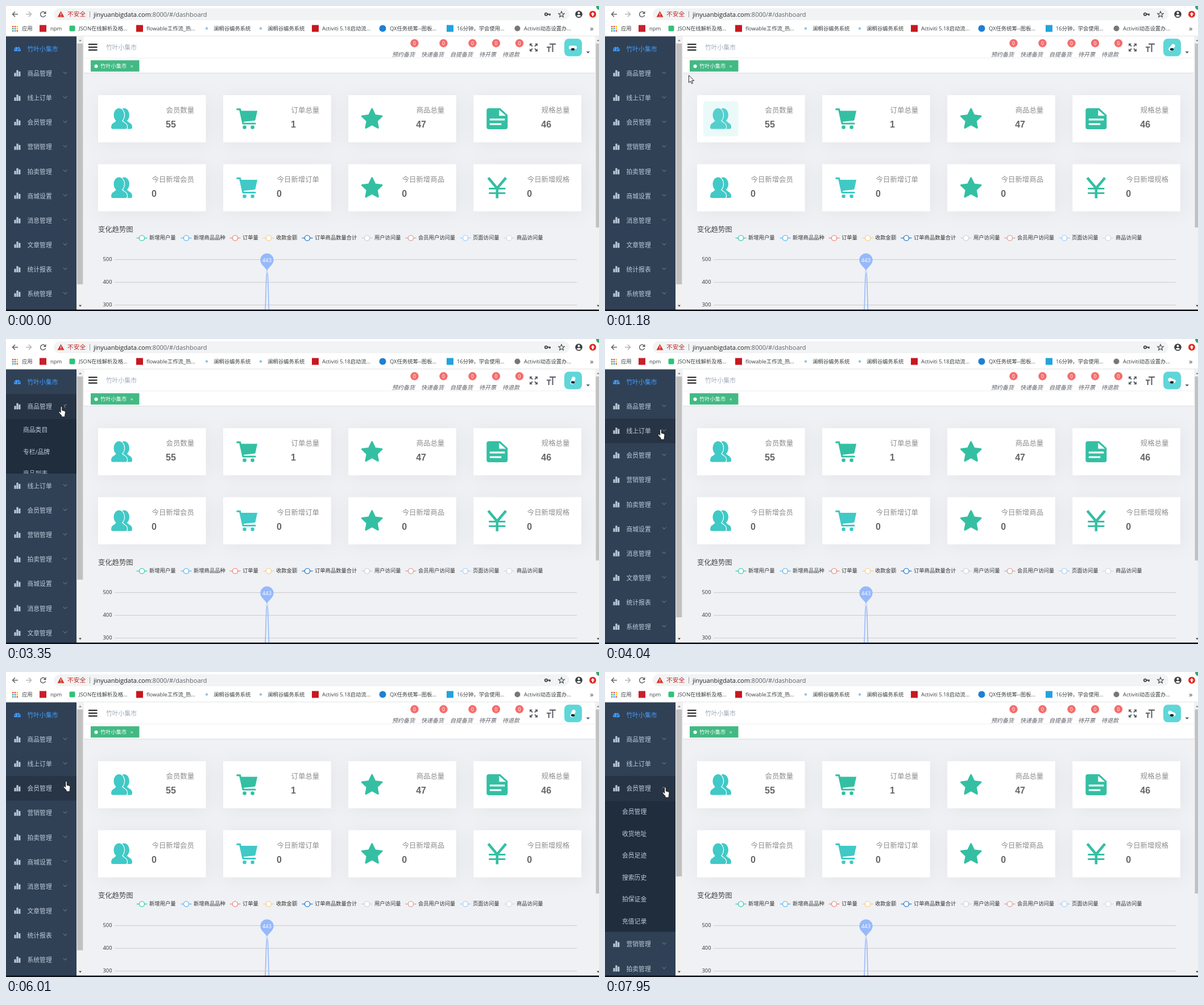
Write an HTML page that moves like this. It is 1043 px wide and 537 px high and loops after 8000 ms.

```html
<!DOCTYPE html>
<html lang="zh-CN">
<head>
<meta charset="utf-8">
<title>Dashboard</title>
<style>
html, body { margin: 0; height: 100%; overflow: hidden; background: #fff; }
#stage { display: block; width: 100vw; height: 100vh; }
text { font-family: "Open Sans", "Noto Sans CJK SC", "Noto Sans CJK", sans-serif; white-space: pre; }
.num { font-family: "Liberation Sans", Arial, sans-serif; font-weight: bold; }
.line { fill: none; stroke: currentColor; }
.icon { fill: currentColor; }
.gap { fill: none; stroke: var(--back); }
.cards { filter: drop-shadow(3px 3px 15px rgba(0, 0, 0, .05)); }
</style>
</head>
<body>
<svg id="stage" viewBox="0 0 1043 537"></svg>
<script>
const LOOP = 8000, ROW = 43.12, SUB = 38.5, TOP = 53.9;
const SHOP = '竹叶小集市';
const stage = document.getElementById('stage');
const $ = id => document.getElementById(id);

// ---- markup helpers ----
const rect = (x, y, w, h, fill, more = '') =>
  `<rect x="${x}" y="${y}" width="${w}" height="${h}" fill="${fill}" ${more}/>`;
const circle = (x, y, r, fill, more = '') =>
  `<circle cx="${x}" cy="${y}" r="${r}" fill="${fill}" ${more}/>`;
const path = (d, fill, more = '') => `<path d="${d}" fill="${fill}" ${more}/>`;
const line = (d, color, w, more = '') =>
  path(d, 'none', `stroke="${color}" stroke-width="${w}" ${more}`);
// y is the vertical middle of the glyphs
const text = (x, y, s, size, fill, more = '') =>
  `<text x="${x}" y="${(y + size * .37).toFixed(2)}" font-size="${size}" fill="${fill}" ${more}>${s}</text>`;
const at = (x, y, body, more = '') => `<g transform="translate(${x} ${y})" ${more}>${body}</g>`;

// ---- browser bars ----
function browser() {
  const grey = '#5f6368', ink = '#3c4043';
  let s = rect(0, 0, 1043, 53.5, '#fff') + rect(84, 4, 907, 21, '#f1f3f4', 'rx="10.5"');
  s += line('M21 14.5H12M16 10L11.5 14.5L16 19', grey, 1.5);
  s += line('M35 14.5H44M40 10L44.5 14.5L40 19', '#b4b6b9', 1.5);
  s += line('M69 12A4.6 4.6 0 1 0 69.6 16', grey, 1.5) + path('M70.5 9V14H65.5Z', grey);
  s += path('M96.5 9L102.5 19.5H90.5Z', '#d93025') + rect(96, 12.5, 1.1, 3.5, '#fff') + rect(96, 17, 1.1, 1.2, '#fff');
  s += text(108, 14.5, '不安全', 10.7, '#c5221f') + rect(147, 9, 1, 11, '#9aa0a6');
  s += text(154, 14.5, `jinyuanbigdata.com<tspan fill="${grey}">:8000/#/dashboard</tspan>`, 11, '#202124');
  s += circle(950, 14.5, 2.2, 'none', `stroke="${ink}" stroke-width="1.8"`) + line('M952.5 14.5H958M956.5 14.5V17', ink, 1.8);
  s += line(starPath(977, 15, 5.5, 2.4), ink, 1.1);
  s += circle(1007.5, 14.5, 6.3, ink) + circle(1007.5, 12.3, 2, '#fff') + path('M1003.5 17.5Q1007.5 13.7 1011.5 17.5Q1007.5 20.5 1003.5 17.5Z', '#fff');
  s += circle(1032, 14.5, 6, '#e0281e') + path('M1032 10.8L1035.5 14.8H1033.3V18H1030.7V14.8H1028.5Z', '#fff');
  s += circle(1044, 1, 6, '#35a56c');
  const dots = ['#ea4335', '#ea4335', '#fbbc04', '#34a853', '#4285f4', '#fbbc04', '#34a853', '#4285f4', '#ea4335'];
  dots.forEach((c, i) => s += rect(11 + i % 3 * 3.8, 35 + (i / 3 | 0) * 3.8, 2.4, 2.4, c));
  const square = (x, c) => rect(x, 33.5, 12, 12, c);
  s += square(59, '#c8202a') + rect(111.5, 34.5, 10, 10, '#2fc27a', 'rx="2"') + square(229, '#c8171e');
  s += circle(353, 39.5, 2.2, '#8cc4ea') + circle(448, 39.5, 2.2, '#8cc4ea') + square(538, '#c8171e');
  s += circle(662.5, 39.5, 6, '#1e80d2') + square(775, '#23a3dc') + circle(899.5, 39.5, 5, '#777');
  const marks = [[28, '应用'], [78, 'npm'], [128, 'JSON在线解析及格...'], [247, 'flowable工作流_热...'],
    [365, '澜桐谷编务系统'], [460, '澜桐谷编务系统'], [556, 'Activiti 5.18启动流...'],
    [675, 'QX任务统筹--图板...'], [793, '16分钟，学会使用...'], [911, 'Activiti动态设置办...']];
  marks.forEach(([x, name]) => s += text(x, 39.5, name, 9.35, ink));
  return s + text(1027, 39, '»', 13, ink) + rect(0, 52.5, 1043, 1, '#d8dadd');
}

function starPath(cx, cy, big, small) {
  let d = '';
  for (let i = 0; i < 10; i++) {
    const r = i % 2 ? small : big, a = i * Math.PI / 5;
    d += `${i ? 'L' : 'M'}${(cx + r * Math.sin(a)).toFixed(2)} ${(cy - r * Math.cos(a)).toFixed(2)}`;
  }
  return d + 'Z';
}

// ---- page header ----
function header() {
  const ink = '#5a5e66';
  let s = rect(137, 53.5, 899, 38.5, '#fff') + rect(137, 91, 899, 1, '#eef0f3') + rect(137, 92, 899, 26, '#fff') + rect(137, 117.5, 899, 1, '#d8dce5');
  s += line('M145 67.5H160.5M145 72.5H160.5M145 77.5H160.5', '#111', 2);
  s += text(176, 73, SHOP, 10.8, '#a0abb9');
  [[679, '预约备货', 718.5], [730, '快递备货', 769.5], [781, '自提备货', 820.5], [832, '待开票', 862], [873, '待退款', 903]]
    .forEach(([x, name, badge]) => {
      s += text(x, 85, name, 10, ink, 'font-style="italic"');
      s += circle(badge, 65.5, 7.2, '#f56c6c') + text(badge, 65.5, '0', 8.6, '#fff', 'text-anchor="middle"');
    });
  for (let a = 0; a < 360; a += 90)
    s += `<g transform="translate(928 73) rotate(${a})">${path('M-7 -7H-2L-7 -2Z', ink) + line('M-6 -6L-2 -2', ink, 2)}</g>`;
  s += line('M956 67H967M961.5 67V81M951 72.5H958.5M954.7 72.5V81', ink, 2);
  s += rect(982, 57.5, 31, 31, '#5fd6d8', 'rx="7.7"');
  s += at(997, 73, rect(-7, -3.2, 14, 6.4, '#fff', 'rx="3.2" id="body"') + '<ellipse cx="0" cy="3.2" rx="3.2" ry="2.2" fill="#1d2a30"/>');
  s += path('M1020.5 80H1027L1023.7 83.5Z', ink);
  s += rect(149, 95.5, 85.5, 20, '#42b983') + circle(158.5, 106, 3.1, '#fff') + text(166, 105.5, SHOP, 9.24, '#fff');
  return s + line('M219.5 104.5L223 108M223 104.5L219.5 108', '#fff', .8);
}

// ---- cards ----
const TEAL = '#40c9c6', GREEN = '#34bfa3';
const person = '<ellipse cx="13.7" cy="12" rx="9.3" ry="12"/><path d="M0 33.5Q0 27.5 5 25.5L10 21H17.5L23 25.5Q28 27.5 28 33.5Q28 36.5 25 36.5H3Q0 36.5 0 33.5Z"/>';
const icons = {
  people: `<g class="icon"><g transform="translate(9 0)">${person}</g><g stroke="var(--back)" stroke-width="2.4">${person}</g>${person}</g>`,
  cart: '<path class="icon" d="M7 4.5H37L33.5 20.5Q33.2 21.7 32 21.8L11.500 24Z"/><path class="line" stroke-width="3.2" stroke-linecap="round" stroke-linejoin="round" d="M1.600 1.800H6.500L12 27H33"/><g class="icon"><circle cx="14.5" cy="33.5" r="3.3"/><circle cx="28.5" cy="33.5" r="3.3"/></g>',
  star: `<path class="icon" stroke="currentColor" stroke-width="3" stroke-linejoin="round" d="${starPath(18.5, 19.6, 18.2, 8.9)}"/>`,
  doc: '<path class="icon" d="M4 0H24L37 12V33Q37 37 33 37H4Q0 37 0 33V4Q0 0 4 0Z"/><path fill="var(--back)" d="M22 2.800L34 13.300H22Z"/><path class="gap" stroke-width="3.2" d="M5.500 19.800H32M5.500 28H26"/>',
  yen: '<path class="line" stroke-width="4.6" d="M3 1L18.5 19.5L34 1M18.5 18V37"/><path class="line" stroke-width="3.2" d="M4 20H33M4 28H33"/>'
};
const cards = [
  ['people', TEAL, '会员数量', 55], ['cart', GREEN, '订单总量', 1], ['star', GREEN, '商品总量', 47], ['doc', GREEN, '规格总量', 46],
  ['people', TEAL, '今日新增会员', 0], ['cart', TEAL, '今日新增订单', 0], ['star', GREEN, '今日新增商品', 0], ['yen', GREEN, '今日新增规格', 0]
].map(([icon, color, label, value], i) =>
  ({ icon, color, label, value, x: 162 + i % 4 * 220.1, y: i < 4 ? 157 : 278.5 }));

function cardGrid() {
  const back = cards.map(c => rect(c.x, c.y, 189.5, 83, '#fff')).join('');
  const front = cards.map((c, i) => at(c.x, c.y,
    `<g id="card${i}">${rect(11, 11, 61.6, 61.6, 'var(--back)', 'rx="4.6"')}${at(23, 23, icons[c.icon])}</g>`
    + text(i < 4 ? 119.5 : 94.5, 26.5, c.label, 12.4, '#8c8c8c')
    + text(i < 4 ? 119 : 94, 51.5, c.value, 16, '#666', 'class="num"'))).join('');
  return `<g class="cards">${back}</g>${front}`;
}

// ---- chart ----
function chart() {
  let s = text(162, 393, '变化趋势图', 12.3, '#464646');
  [[239, '新增用户量', '#3fcfb8'], [317, '新增商品品种', '#62bdf5'], [403, '订单量', '#f08d84'], [462, '收款金额', '#f9cf8c'],
    [530, '订单商品数量合计', '#2f80d0'], [635, '用户访问量', '#cfd2e0'], [712, '会员用户访问量', '#dba59d'],
    [808, '页面访问量', '#a8d0f8'], [885, '商品访问量', '#dadbe0']].forEach(([x, name, c]) => {
    s += line(`M${x - 9.5} 408.5H${x + 9.5}`, c, 1.4) + circle(x, 408.5, 4.6, '#fff', `stroke="${c}" stroke-width="1.4"`);
    s += text(x + 13, 407.5, name, 9.3, '#333');
  });
  [500, 400, 300].forEach((v, i) => {
    const y = 446.5 + 40 * i;
    s += line(`M191 ${y}H1004`, '#ccc', 1) + text(186.5, y - .8, v, 9.3, '#333', 'text-anchor="end"');
  });
  s += line('M456 537C457.5 500 457.5 469 459.3 469S461 500 462.5 537', '#97b9fb', 1.6);
  s += circle(459, 468.5, 1.6, '#fff', 'stroke="#97b9fb" stroke-width=".8"');
  s += path('M459 466.5C456 459 447.3 456 447.3 447.3A11.7 11.7 0 0 1 470.7 447.3C470.7 456 462 459 459 466.5Z', '#97b9fb');
  return s + text(459, 448, 443, 9.3, '#fff', 'text-anchor="middle"');
}

// ---- side menu ----
const titles = [SHOP, '商品管理', '线上订单', '会员管理', '营销管理', '拍卖管理', '商城设置', '消息管理', '文章管理', '统计报表', '系统管理', '日志管理'];
const subs = [
  { row: 1, on: 2060, off: 3227, items: ['商品类目', '专栏/品牌', '商品列表', '商品规格'] },
  { row: 2, on: 4300, off: 5300, items: ['线上订单', '通用问题', '手机发货'] },
  { row: 3, on: 6250, off: 1e9, items: ['会员管理', '收货地址', '会员足迹', '搜索历史', '拍保证金', '充值记录'] }
];
const PALE = '#bfcbd9';

function sideMenu() {
  const gauge = path('M-5.5 4A5.8 5.8 0 1 1 5.5 4Z', '#409eff')
    + [-3.6, 0, 3.6].map(x => circle(x, x ? .5 : -3, .9, '#304156')).join('') + line('M0 3L1.5 -1', '#304156', 1.3);
  const bars = rect(14.5, 20.7, 3.1, 6.2, PALE) + rect(18.4, 16, 3.1, 10.9, PALE) + rect(22.3, 18.3, 3.1, 8.6, PALE);
  const panels = subs.map((m, i) => `<g id="sub${i}">${rect(0, 0, 124, m.items.length * SUB + 1, '#1f2d3d')}${
    m.items.map((s, k) => text(30, 20 + k * SUB, s, 10.8, PALE)).join('')}</g>`).join('');
  const rows = titles.map((s, i) => `<g id="row${i}">${rect(0, 0, 124, 44, '#304156', `id="fill${i}"`)}${
    i ? bars : at(20, 21.5, gauge)}${text(37.5, 22, s, 10.8, i ? PALE : '#409eff')}${
    i ? at(104, 20.5, line('M-3.3 -1.7L0 1.7L3.3 -1.7', '#8794a4', .9, `id="arrow${i}"`)) : ''}</g>`).join('');
  return rect(0, 53.5, 124, 483.5, '#304156')
    + `<svg y="${TOP}" width="124" height="481">${panels}${rows}</svg>`;
}

function scrollbars() {
  const up = 'M-2.5 1.5H2.5L0 -1.5Z', down = 'M-2.5 -1.5H2.5L0 1.5Z';
  return rect(124, 53.5, 13, 481.5, '#f1f1f1') + rect(125, 66, 10.3, 424, '#c1c1c1', 'id="thumb"')
    + rect(1036, 53.5, 7, 481.5, '#f1f1f1') + rect(1037.5, 66, 5.5, 324, '#c1c1c1')
    + at(130.5, 60.5, path(up, '#8a8a8a')) + at(130.5, 528, path(down, '#444'))
    + at(1041.5, 60.5, path(up, '#8a8a8a')) + at(1041.5, 528, path(down, '#444'));
}

const pointer = `<g id="cursor" stroke="#111" stroke-width=".9" stroke-linejoin="round" fill="#fff">
  <path id="tip" d="M0 0V13L3 10.3L5 14.8L7 14L5 9.6H9.2Z"/>
  <path id="hand" transform="translate(-5 -.5)" d="M3.600 11V1.800C3.600 -.100 6.200 -.100 6.200 1.800V7.200L10 8Q12.200 8.600 12 11L11.200 15.500V18.500H5V16L.800 11.500Q-.400 9.600 1.400 9Q2.500 9 3.600 11Z"/></g>`;

stage.innerHTML = rect(137, 92, 899, 445, '#f0f1f4') + cardGrid() + chart() + browser() + header()
  + sideMenu() + scrollbars() + rect(0, 534.5, 1043, 2.5, '#0d0f18') + pointer;

// ---- motion ----
const smooth = x => (x = Math.min(1, Math.max(0, x)), x * x * (3 - 2 * x));
const mix = (a, b, k) => 'rgb(' + [1, 3, 5].map(i => {
  const p = parseInt(a.slice(i, i + 2), 16), q = parseInt(b.slice(i, i + 2), 16);
  return Math.round(p + (q - p) * k);
}) + ')';
const track = [[70, 1008, 537], [800, 400, 236], [860, 385, 223], [1180, 147.5, 122], [1500, 130, 110], [1750, 100, 118],
  [2000, 97.5, 119], [3500, 97.5, 119], [3900, 98, 159], [5450, 98, 159], [5950, 106, 192.5], [6050, 106, 192.5], [6200, 106, 203]];

function mouse(t) {
  const n = track.findIndex(k => k[0] > t);
  if (n < 1) { const [, x, y] = n ? track[track.length - 1] : track[0]; return [x, y]; }
  const [t0, x0, y0] = track[n - 1], [t1, x1, y1] = track[n], k = (t - t0) / (t1 - t0);
  return [x0 + (x1 - x0) * k, y0 + (y1 - y0) * k];
}
const openness = (m, t) => smooth((t - m.on) / 300) - smooth((t - m.off) / 300);
const panelHeight = (m, t) => openness(m, t) * m.items.length * SUB;
const rowTop = (i, t) => subs.reduce((y, m) => y + (m.row < i ? panelHeight(m, t) : 0), i * ROW);
const overCard = (c, x, y) => x > c.x && x < c.x + 189.5 && y > c.y && y < c.y + 83;

// Hover strengths over the whole loop, in 10 ms steps: cards first, then rows
const hover = [];
for (let t = 0, now = Array(cards.length + titles.length).fill(0); t <= LOOP; t += 10) {
  const [x, y] = mouse(t);
  now = now.map((v, i) => {
    const r = i - cards.length, dy = y - TOP - rowTop(r, t);
    const on = r < 0 ? overCard(cards[i], x, y) : x < 124 && dy > 0 && dy < ROW;
    return v + (on - v) * 10 / (r < 0 ? 60 : 80);
  });
  hover.push(now);
}

function draw(t) {
  const [x, y] = mouse(t), glow = hover[Math.floor(t / 10)];
  cards.forEach((c, i) => {
    const st = $('card' + i).style;
    st.color = mix(c.color, '#ffffff', glow[i]);
    st.setProperty('--back', mix('#ffffff', c.color, glow[i]));
  });
  titles.forEach((_, i) => {
    $('row' + i).setAttribute('transform', `translate(0 ${rowTop(i, t)})`);
    $('fill' + i).setAttribute('fill', mix('#304156', '#263445', glow[cards.length + i]));
  });
  let extra = 0;
  subs.forEach((m, i) => {
    extra += panelHeight(m, t);
    const panel = $('sub' + i);
    panel.setAttribute('transform', `translate(0 ${rowTop(m.row, t) + ROW})`);
    panel.style.display = openness(m, t) > 0 ? '' : 'none';
    $('arrow' + m.row).setAttribute('transform', `rotate(${180 * openness(m, t)})`);
  });
  $('thumb').setAttribute('height', 424 * 522 / (522 + extra));
  const beat = Math.floor(t / 80) * 80;
  $('body').setAttribute('transform', `rotate(${-75 * Math.sin(beat / 530 * 2 * Math.PI)})`);
  const link = x < 124 || cards.some(c => overCard(c, x, y));
  $('cursor').setAttribute('transform', `translate(${x} ${y})`);
  $('cursor').style.display = t < 70 ? 'none' : '';
  $('tip').style.display = link ? 'none' : '';
  $('hand').style.display = link ? '' : 'none';
}

const start = performance.now();
function frame() {
  draw((performance.now() - start) % LOOP);
  requestAnimationFrame(frame);
}
frame();
</script>
</body>
</html>
```
